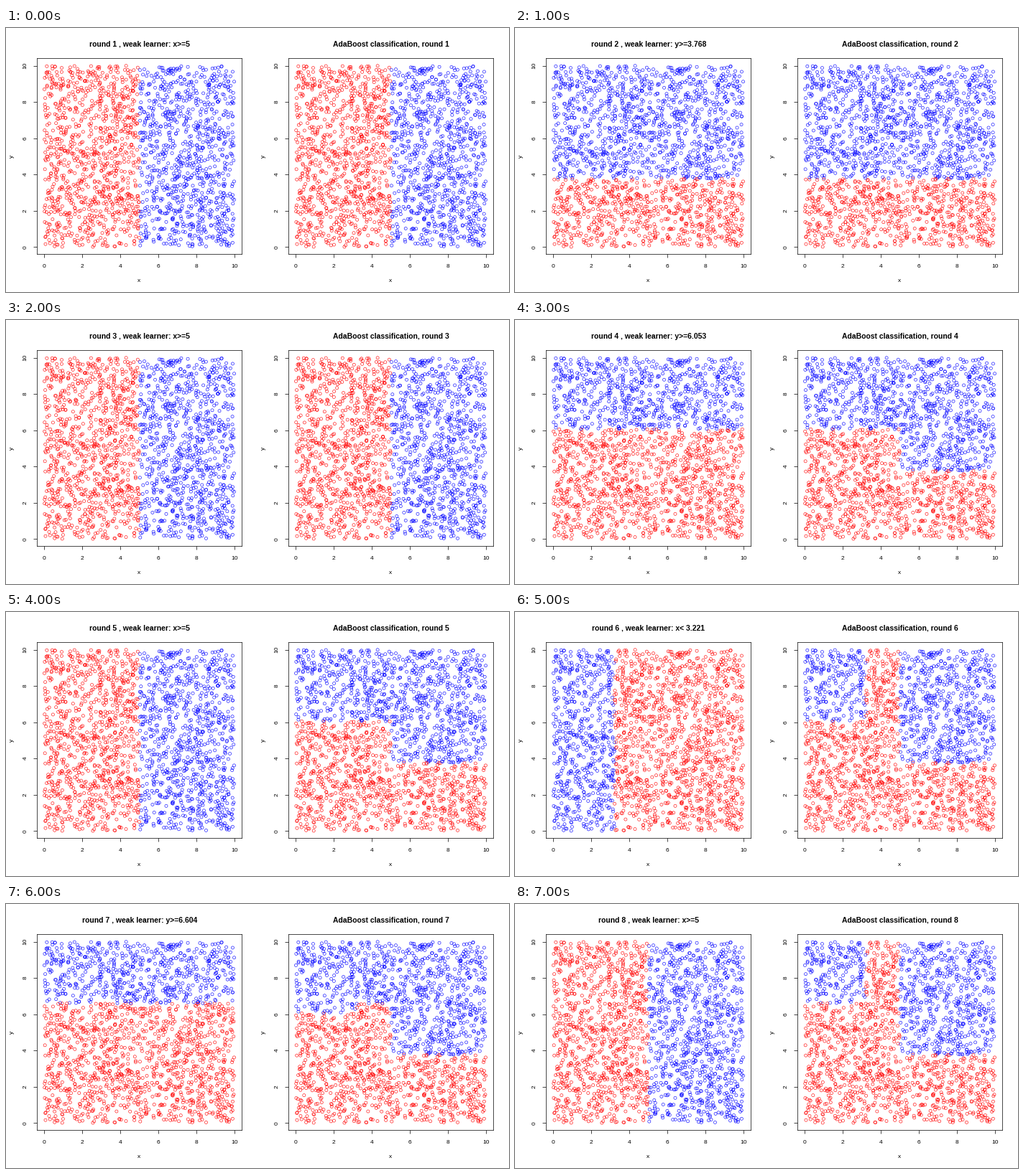
Animation of 700x368 px, one loop 8 s. Source, as a matplotlib script:

```python
import matplotlib.pyplot as plt
import numpy as np
from matplotlib.animation import FuncAnimation

W, H, DPI = 700, 368, 100
PT = 72 / DPI  # points per pixel
PANEL_SHIFT = 350
LEFT, RIGHT, TOP, BOTTOM = 42.6, 328.3, 42.4, 315.3
UNIT_X, UNIT_Y = (RIGHT - LEFT) / 10.8, (BOTTOM - TOP) / 10.8

# (feature, comparison, threshold, vote weight) for each boosting round
LEARNERS = [
    ("x", ">=", 5, 1.0),
    ("y", ">=", 3.768, 1.2),
    ("x", ">=", 5, 0.9),
    ("y", ">=", 6.053, 1.2),
    ("x", ">=", 5, 0.4),
    ("x", "< ", 3.221, 0.45),
    ("y", ">=", 6.604, 0.45),
    ("x", ">=", 5, 0.4),
]

plt.rcParams["font.family"] = "Liberation Sans"

rng = np.random.default_rng(7)
points = rng.uniform(0, 10, (2000, 2))


def predict(learner):
    feature, comparison, threshold, _ = learner
    values = points[:, "xy".index(feature)]
    positive = values >= threshold if comparison == ">=" else values < threshold
    return np.where(positive, 1, -1)


def ensemble(rounds):
    return sum(learner[3] * predict(learner) for learner in LEARNERS[:rounds])


def colors(score):
    return np.where(score > 0, "blue", "red")


fig = plt.figure(figsize=(W / DPI, H / DPI), dpi=DPI, facecolor="white")


def label(x, y, text, size=8.4, **style):
    return fig.text(x / W, 1 - y / H, text, fontsize=size * PT,
                    ha="center", **style)


def make_panel(dx):
    ax = fig.add_axes([(LEFT + dx) / W, 1 - BOTTOM / H,
                       (RIGHT - LEFT) / W, (BOTTOM - TOP) / H])
    ax.set(xlim=(-0.4, 10.4), ylim=(-0.4, 10.4),
           xticks=range(0, 11, 2), yticks=range(0, 11, 2))
    ax.tick_params(length=5 * PT, width=0.7 * PT,
                   labelbottom=False, labelleft=False)
    for spine in ax.spines.values():
        spine.set_linewidth(0.7 * PT)
    for tick in range(0, 11, 2):
        label(LEFT + dx + UNIT_X * (tick + 0.4), 334, str(tick), va="baseline")
        label(27 + dx, BOTTOM - UNIT_Y * (tick + 0.4), str(tick),
              va="center", rotation=90)
    label(185.5 + dx, 354.5, "x", va="baseline")
    label(8.5 + dx, 179, "y", va="center", rotation=90)
    dots = ax.scatter(*points.T, s=(4.1 * PT) ** 2, facecolors="none",
                      edgecolors="red", linewidths=0.58 * PT)
    title = label(185.8 + dx, 25.5, "", size=10.4, weight="bold", va="baseline")
    return dots, title


weak_dots, weak_title = make_panel(0)
vote_dots, vote_title = make_panel(PANEL_SHIFT)


def draw(frame):
    number = frame + 1
    learner = LEARNERS[frame]
    feature, comparison, threshold, _ = learner
    weak_title.set_text(
        f"round {number} , weak learner: {feature}{comparison}{threshold}")
    vote_title.set_text(f"AdaBoost classification, round {number}")
    weak_dots.set_edgecolors(colors(predict(learner)))
    vote_dots.set_edgecolors(colors(ensemble(number)))
    return weak_dots, weak_title, vote_dots, vote_title


anim = FuncAnimation(fig, draw, frames=len(LEARNERS), interval=1000,
                     repeat=True, repeat_delay=0, blit=False)
plt.show()
```
